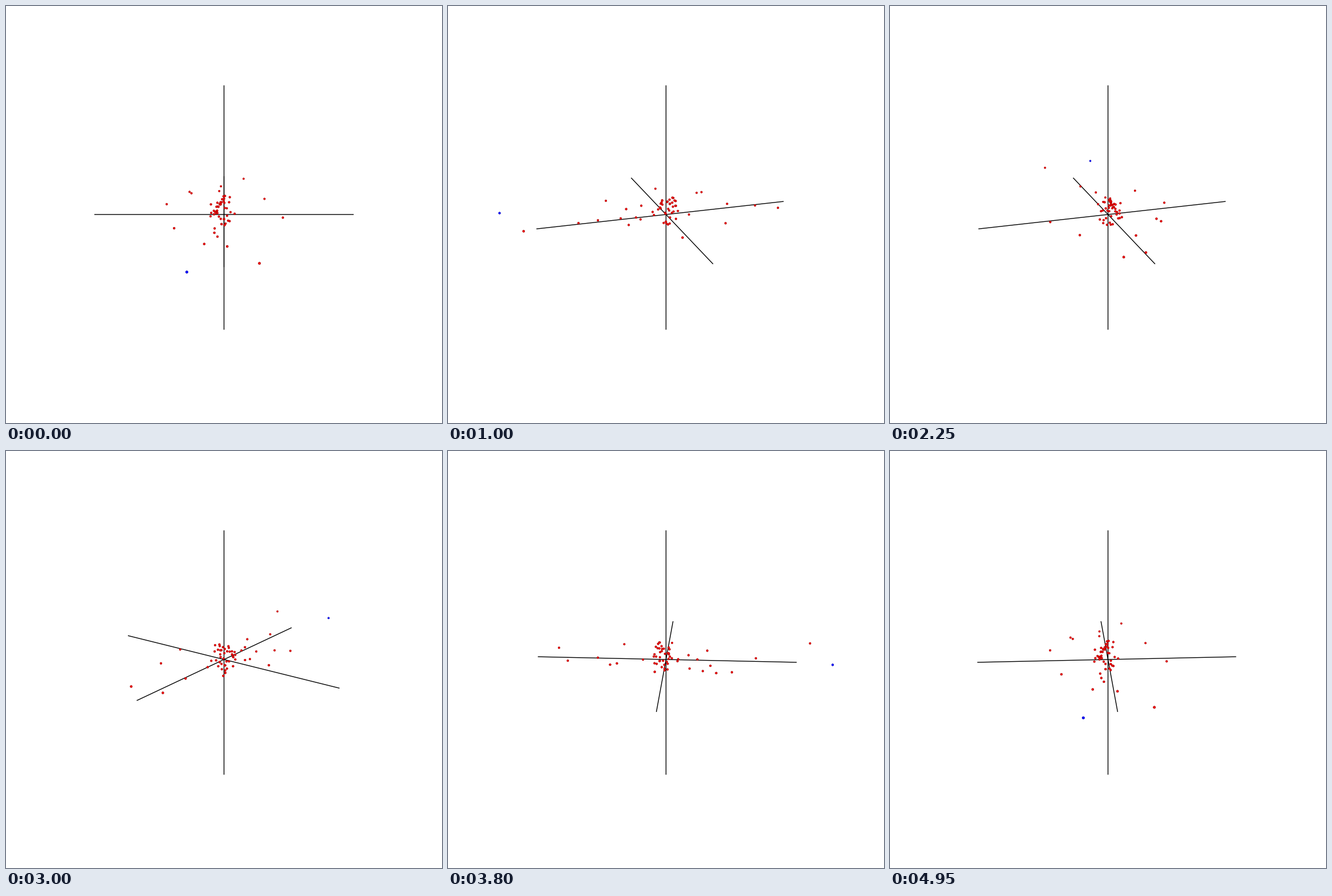
Write a matplotlib script that moves like this. It is 765x732 px and loops after 5 s.

```python
import numpy as np
import matplotlib.pyplot as plt
from matplotlib.animation import FuncAnimation

W, H, DPI = 765, 732, 100
FRAMES, INTERVAL = 100, 50
PX = 72 / DPI                      # points per pixel
CX, CY = W / 2, H / 2
AXIS = 227.5                       # half length of each axis
CAMERA = 6 * AXIS
TILT = np.radians(20)
DOT, RIM = 3.6, 0.5                # dot diameter and outline in pixels

RED, DARK_RED = (0.93, 0, 0), (0.6, 0, 0)
BLUE, DARK_BLUE = (0, 0, 1), (0, 0, 0.65)

# x right, y up, z towards the viewer
BLUE_POINT = (-52.4, 16, 281)
OUTLIERS = [
    (51, 18, 255), (39, 4, -197), (-6, -4, -173), (5, 4, 157),
    (-9, 4, -119), (-32, -9, 115), (-64, 12, -90), (-60, 13, -79),
    (-82, 8, 88), (75, 1, -82), (-101, 15, -12), (103, -4, 5),
    (-16, -4, 78), (0, 18, 72), (-11, -16, 65), (1, 1, 55),
    (-16, -10, 42), (-17, 15, 40), (5, -3, -41),
]


def core_points(count, seed):
    """Random shell around the centre, lifted a little above it."""
    rng = np.random.default_rng(seed)
    way = rng.normal(size=(count, 3))
    way /= np.linalg.norm(way, axis=1, keepdims=True)
    radius = rng.uniform(12, 27, (count, 1))
    return way * radius + [0, 6, -2]


def project(points, angle):
    """Turn about the vertical axis; return screen x, y, scale and nearness."""
    x, y, z = np.asarray(points, float).T
    c, s = np.cos(angle), np.sin(angle)
    x, z = x * c - z * s, x * s + z * c
    near = z * np.cos(TILT) + y * np.sin(TILT)
    rise = y * np.cos(TILT) - z * np.sin(TILT)
    scale = 1 / (1 - near / CAMERA)
    return CX + x * scale, CY - rise * scale, scale, near


cloud = np.vstack([BLUE_POINT, OUTLIERS, core_points(38, seed=7)])
is_blue = np.arange(len(cloud)) == 0

fig = plt.figure(figsize=(W / DPI, H / DPI), dpi=DPI, facecolor="white")
ax = fig.add_axes([0, 0, 1, 1])
ax.set_xlim(0, W)
ax.set_ylim(H, 0)
ax.axis("off")

lines = [ax.plot([], [], color="black", lw=1.4 * PX, snap=False,
                 solid_capstyle="butt", zorder=1)[0] for _ in range(3)]
dots = ax.scatter(cloud[:, 0], cloud[:, 1], linewidths=RIM * PX, zorder=2)


def update(i):
    angle = 2 * np.pi * i / FRAMES
    for line, end in zip(lines, np.eye(3) * AXIS):
        x, y, _, _ = project([-end, end], angle)
        line.set_data(x, y)

    x, y, scale, near = project(cloud, angle)
    order = np.argsort(near)       # far dots first
    dots.set_offsets(np.column_stack([x, y])[order])
    dots.set_sizes((DOT * scale[order] * PX) ** 2)
    dots.set_facecolors([BLUE if b else RED for b in is_blue[order]])
    dots.set_edgecolors([DARK_BLUE if b else DARK_RED for b in is_blue[order]])
    return [*lines, dots]


anim = FuncAnimation(fig, update, frames=FRAMES, interval=INTERVAL,
                     repeat=True, repeat_delay=0)
plt.show()
```
